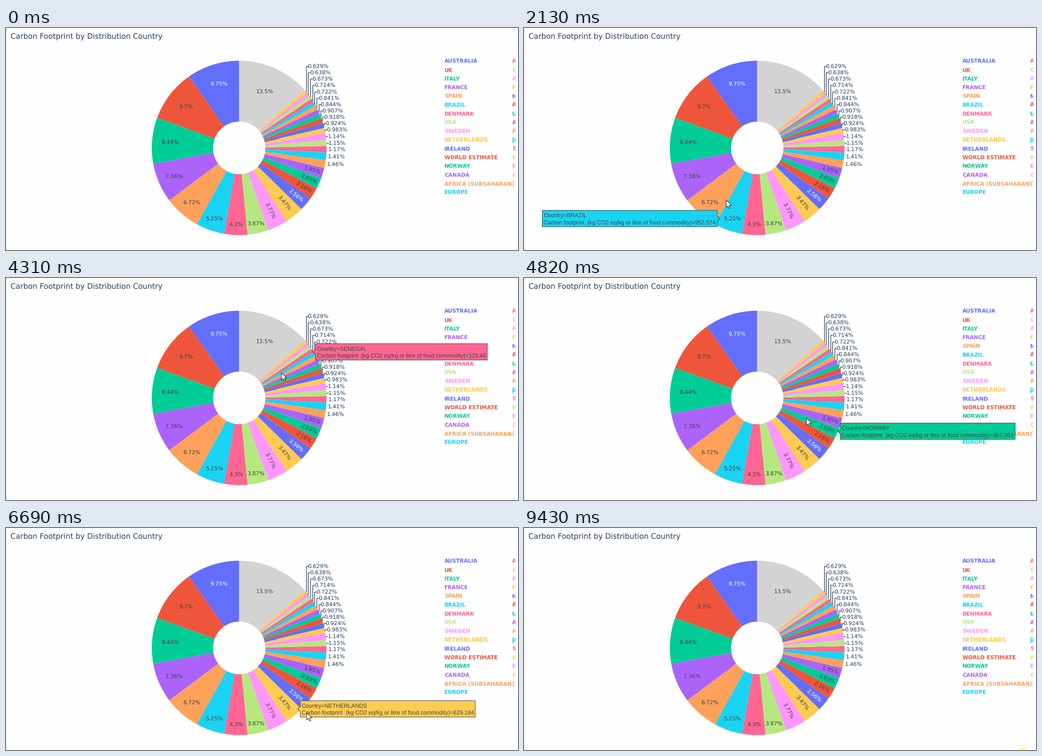
A matplotlib script that plays this animation: 1134 px wide and 494 px high, repeating every 9.49 s.

```python
import math

import numpy as np
import matplotlib.pyplot as plt
from matplotlib.animation import FuncAnimation
from matplotlib.patches import Circle, Polygon, Rectangle, Wedge

W, H, DPI = 1134, 494, 100
LOOP, STEP = 9490, 26
CX, CY, R, HOLE = 516.5, 267.3, 193.5, 58
TOTAL = 18140
HOVER_LAG = 20
LABEL_GAP = 14.15
LABEL_ASPECT = 2.7

NAVY, DARK, WHITE, PAPER = "#2a3f5f", "#444444", "#ffffff", "#fefefe"
PALETTE = ["#636efa", "#ef553b", "#00cc96", "#ab63fa", "#ffa15a",
           "#19d3f3", "#ff6692", "#b6e880", "#ff97ff", "#fecb52"]

COUNTRIES = """AUSTRALIA,UK,ITALY,FRANCE,SPAIN,BRAZIL,DENMARK,USA,SWEDEN,
NETHERLANDS,IRELAND,WORLD ESTIMATE,NORWAY,CANADA,AFRICA (SUBSAHARAN),EUROPE,
ARGENTINA,GERMANY,AUSTRIA,FINLAND,NEW ZEALAND,ASIA,UKRAINE,ALBANIA,ALGERIA,
JAPAN,SENEGAL,WALES,EGYPT,GREECE,OTHERS""".replace("\n", "").split(",")
SHARES = [9.75, 9.7, 8.44, 7.36, 6.72, 5.25, 4.3, 3.87, 3.77, 3.47, 2.56,
          2.16, 2.03, 1.95, 1.46, 1.41, 1.17, 1.15, 1.14, .983, .924, .918,
          .907, .844, .841, .722, .714, .673, .638, .629]
SHARES.append(100 - sum(SHARES))
VALUES = {"BRAZIL": "952.574", "AUSTRALIA": "1,768.529", "SENEGAL": "129.45",
          "NORWAY": "367.303", "NETHERLANDS": "629.184"}

# turning points of the pointer: time in ms, x, y
TIMES, XS, YS = zip(
    (510, 908, 500), (850, 697, 443), (1160, 697, 443), (1650, 560, 387),
    (2086, 454, 385), (2106, 448, 383), (3050, 398, 254), (3614, 458, 171),
    (4010, 556, 185), (4290, 610, 211), (4770, 626, 309), (4970, 624, 322),
    (5940, 560, 386), (6330, 502, 400), (6620, 502, 400), (6682, 666, 411),
    (7050, 800, 500), (7600, 1074, 500), (8100, 1000, 90), (8540, 994, 237),
    (9110, 1094, 500))

plt.rcParams.update({"text.hinting": "none", "font.family": "DejaVu Sans"})
fig = plt.figure(figsize=(W / DPI, H / DPI), dpi=DPI, facecolor=PAPER)


def px(size):
    return size * 72 / DPI


def stage():
    ax = fig.add_axes([0, 0, 1, 1])
    ax.set_xlim(0, W)
    ax.set_ylim(H, 0)
    ax.axis("off")
    return ax


def put_text(ax, x, y, text, size, color, ha="left", turn=0, **font):
    """Text centred on y by its digit height; turn is clockwise degrees."""
    drop, a = 0.365 * size, math.radians(turn)
    return ax.text(x - drop * math.sin(a), y + drop * math.cos(a), text,
                   fontsize=px(size), color=color, ha=ha, va="baseline",
                   rotation=-turn, rotation_mode="anchor", **font)


def contrast(color):
    return WHITE if color == PALETTE[0] else DARK


class Slice:
    """A ring sector; angles run counter-clockwise from the top."""

    def __init__(self, name, color, start, share):
        self.name, self.color, self.share = name, color, share
        self.start, self.end = start, start + 3.6 * share
        self.mid = (self.start + self.end) / 2
        self.half = math.radians(self.end - self.start) / 2
        s = math.sin(self.half)
        self.inner = R * min(s / (1 + s), 0.35)
        self.center = self.at(R - self.inner)
        self.label = f"{share:.3g}%"
        self.value = VALUES.get(name, f"{share / 100 * TOTAL:,.3f}")

    def at(self, radius):
        a = math.radians(self.mid)
        return CX - radius * math.sin(a), CY - radius * math.cos(a)

    def radial_spot(self):
        """Centre of the largest label fitting lengthwise into the sector."""
        q = LABEL_ASPECT + 1 / (2 * math.tan(self.half))
        h = 1 / (math.sqrt(q * q + 0.5) + q)
        return self.at(R * (math.cos(h) - h * LABEL_ASPECT))


slices = []
for i, (name, share) in enumerate(zip(COUNTRIES, SHARES)):
    color = PALETTE[i % 10] if i < 30 else "#d3d3d3"
    slices.append(Slice(name, color, slices[-1].end if slices else 0, share))


def draw_labels(ax):
    """Wide sectors read level, narrow ones radially, thin ones outside."""
    floor = H
    for s in slices:
        if s.share < 1.9:
            x, rim = s.at(R)
            y = floor = min(rim, floor - LABEL_GAP)
            if y < rim:
                ax.plot([x, x, x + 4], [rim, y, y], color=NAVY, lw=px(1.4),
                        solid_joinstyle="miter")
            put_text(ax, x + 4, y + 0.4, s.label, 12.1, NAVY)
        else:
            radial = s.share < 3.8
            x, y = s.radial_spot() if radial else s.center
            put_text(ax, x, y, s.label, 12.1, contrast(s.color), "center",
                     270 - s.mid if radial else 0)


def draw_chart(ax):
    put_text(ax, 10, 19.5, "Carbon Footprint by Distribution Country", 16.5, NAVY)
    for i, s in enumerate(slices):
        ax.add_patch(Wedge((CX, CY), R, 270 - s.end, 270 - s.start,
                           width=R - HOLE, fc=s.color, lw=0))
        column, row = divmod(i, 16)
        put_text(ax, 971 + 150 * column, 75 + 19.4 * row, s.name, 11.7,
                 s.color, weight="bold")
    draw_labels(ax)
    ax.add_patch(Rectangle((1128, 0), 6, H, fc=PAPER, lw=0, zorder=9))
    ax.add_patch(Rectangle((0, 0), 1, H, fc="#dddddd", lw=0))


# the chart never changes, so it is rendered once and reused as a backdrop
chart = stage()
draw_chart(chart)
fig.canvas.draw()
backdrop = np.asarray(fig.canvas.buffer_rgba()).copy()
chart.remove()

ax = stage()
ax.imshow(backdrop, extent=(0, W, H, 0), aspect="auto", interpolation="nearest")

bubble = ax.add_patch(Polygon([(0, 0), (1, 1), (0, 1)], lw=px(1.1), zorder=3,
                              joinstyle="miter"))
lines = [put_text(ax, 0, 0, "", 12.6, DARK, family="Liberation Sans", zorder=4)
         for _ in range(2)]
ARROW = np.array([(0, 0), (0, 16.2), (3.8, 12.7), (6.4, 18.6), (9, 17.5),
                  (6.5, 11.8), (11.6, 11.6)])
pointer = ax.add_patch(Polygon(ARROW, fc=WHITE, ec="#222222", lw=px(1.1), zorder=6))
halo = ax.add_patch(Circle((1105, 501.5), 12.5, fc="#ffff66", lw=0, zorder=5))


def pointer_at(t):
    return np.interp(t, TIMES, XS), np.interp(t, TIMES, YS)


def hovered(x, y):
    if not HOLE < math.hypot(x - CX, y - CY) < R:
        return None
    angle = math.degrees(math.atan2(CX - x, CY - y)) % 360
    return next((s for s in slices if s.start <= angle < s.end), None)


def show_bubble(s):
    for item in (bubble, *lines):
        item.set_visible(s is not None)
    if s is None:
        return
    ink = contrast(s.color)
    lines[0].set_text(f"Country={s.name}")
    lines[1].set_text("Carbon footprint  (kg CO2 eq/kg or litre of food "
                      f"commodity)={s.value}")
    width = lines[1].get_window_extent().width * W / fig.bbox.width + 6
    x, y = s.center
    # left-hand sectors open leftwards unless the box leaves the plot
    side = -1 if x < CX and x - s.inner - 6 - width > -55 else 1
    tip = x + side * s.inner
    near, far = tip + side * 6, tip + side * (6 + width)
    bubble.set_xy([(tip, y), (near, y + 6), (near, y + 18.2), (far, y + 18.2),
                   (far, y - 18.2), (near, y - 18.2), (near, y - 6)])
    bubble.set_facecolor(s.color)
    bubble.set_edgecolor(ink)
    for line, offset in zip(lines, (-8, 8.5)):
        line.set_position((min(near, far) + 3, y + offset + 4.6))
        line.set_color(ink)


def update(i):
    t = i * STEP
    pointer.set_xy(ARROW + pointer_at(t))
    show_bubble(hovered(*pointer_at(t - HOVER_LAG)))
    halo.set_visible(t >= 9410)
    return bubble, *lines, pointer, halo


animation = FuncAnimation(fig, update, frames=LOOP // STEP, interval=STEP,
                          repeat=True, repeat_delay=0, blit=False)
plt.show()
```
